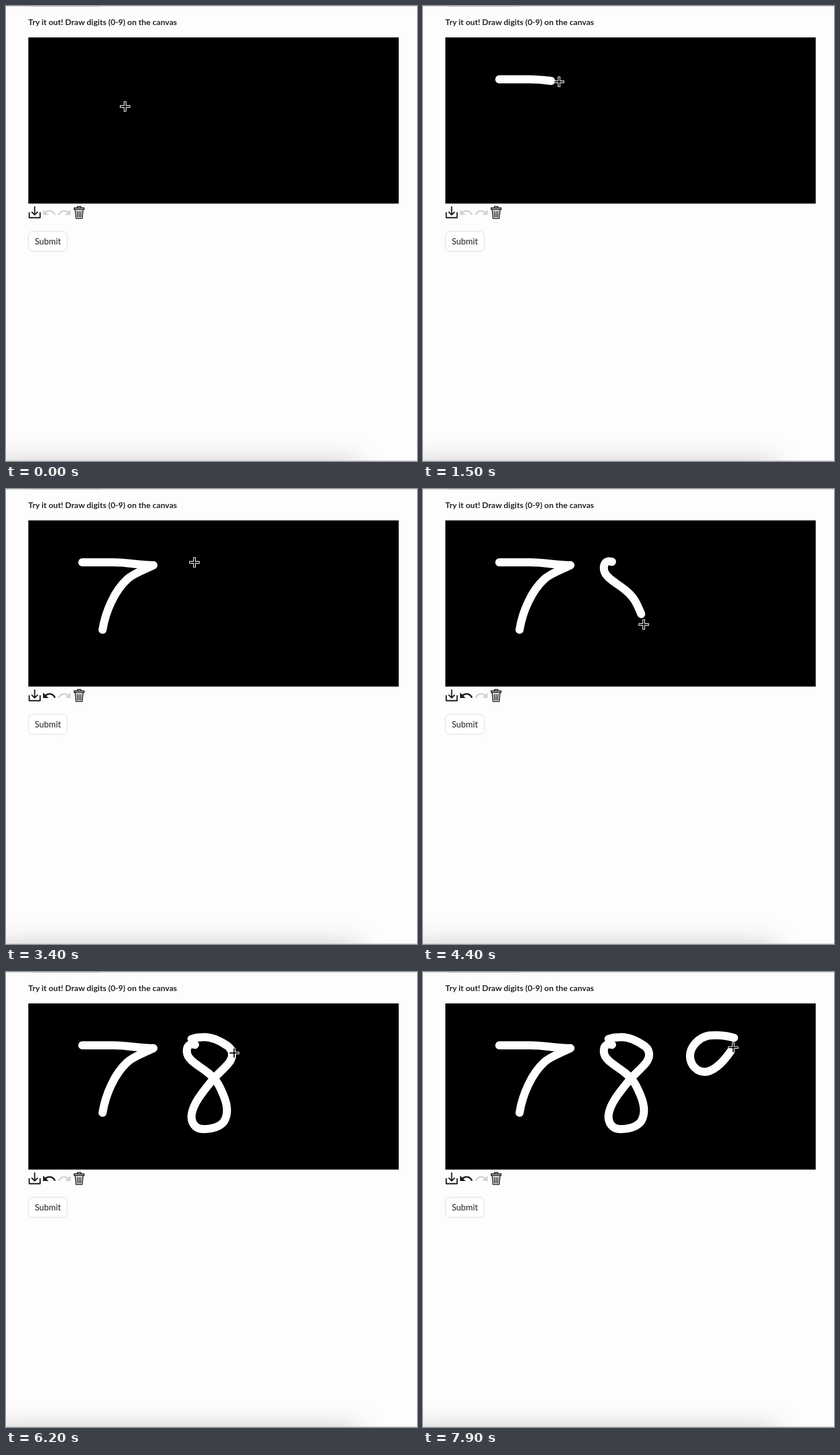
Write an HTML page that moves like this. It is 711 px wide and 788 px high and loops after 8000 ms.

```html
<!DOCTYPE html>
<html lang="en">
<head>
<meta charset="utf-8">
<title>Draw digits</title>
<style>
  html, body { margin: 0; width: 100%; height: 100%; overflow: hidden; background: #fdfdfd; }
  svg { display: block; overflow: hidden; }
  text { font-family: Lato, "Open Sans", sans-serif; fill: #22232a; }
  .shadow { fill: rgba(45, 25, 50, .25); filter: blur(23px); }
  .track { fill: none; stroke: none; stroke-width: 14; stroke-linecap: round; stroke-linejoin: round; }
  .icon { fill: none; stroke: #1c1c1e; stroke-width: 1.6; stroke-linejoin: round; stroke-linecap: round; }
</style>
</head>
<body>
<svg width="711" height="788" viewBox="0 0 711 788">
  <rect class="shadow" x="-20" y="791" width="628" height="80"/>
  <path d="M0 .5H711M0 787.5H711" stroke="#cfcfcf"/>
  <path d="M42 .5H165" stroke="#b4b4b6"/>
  <text x="38.6" y="32.5" font-size="14.1" font-weight="700">Try it out! Draw digits (0-9) on the canvas</text>
  <rect x="38.6" y="54.4" width="640.8" height="287.8"/>

  <path class="icon" d="M40.2 358V366.6H59V358M49.6 348V361.5M44.8 357L49.6 361.8L54.4 357" style="stroke-width:2.1"/>
  <defs>
    <path id="arrow" d="M12.5 8c-2.65 0-5.05.99-6.9 2.6L2 7v9h9l-3.62-3.62c1.39-1.16 3.16-1.88 5.12-1.88 3.54 0 6.55 2.31 7.6 5.5l2.37-.78C21.08 11.03 17.15 8 12.5 8z"/>
  </defs>
  <use id="undo" href="#arrow" transform="translate(61.9 345) scale(1.07)"/>
  <use href="#arrow" transform="translate(114 345) scale(-1.07 1.07)" fill="#d3d3d3"/>
  <path class="icon" d="M118 349.6H135V352.4H118ZM123.5 349.4V347.2H129.5V349.4M119.8 353L121.2 368H131.8L133.2 353M123.3 355.5L123.8 365.5M126.5 355.5V365.5M129.7 355.5L129.2 365.5"/>

  <rect x="38.7" y="390.2" width="67.3" height="34.6" rx="8" fill="#fff" stroke="#d9d9dc"/>
  <text x="72.4" y="412.8" font-size="14.8" text-anchor="middle">Submit</text>

  <g id="tracks"></g>
  <g id="cursor" fill="none">
    <path d="M-9 0H9M0 -9V9" stroke="#fff" stroke-width="4.4"/>
    <path d="M-8 0H8M0 -8V8" stroke="#000" stroke-width="2"/>
  </g>
</svg>
<script>
const LOOP = 8000, STEP = 100, UNDO_READY = 2500;
const INK_LAG = 60, PEN_HOLD = 40;

const linear = u => u;
const easeOut = u => u * (2 - u);
const smooth = u => u * u * (3 - 2 * u);
const byId = id => document.getElementById(id);
const tracks = [];

// The cursor follows the path from start to end; with a pen-down time it leaves ink.
function track(start, end, ease, d, down) {
  const path = document.createElementNS("http://www.w3.org/2000/svg", "path");
  path.setAttribute("class", "track");
  path.setAttribute("d", d);
  byId("tracks").append(path);
  const length = path.getTotalLength();
  const travelled = t => length * ease(Math.min(1, Math.max(0, (t - start) / (end - start))));
  tracks.push({ path, end, down, begin: down ?? start, travelled });
}

track(0, 900, smooth, "M206 174C190 115 142 -8 132 127");
// 7
track(1200, 1700, easeOut, "M132 127H185C215 127 225 132 255 132", 1000);
track(1700, 2500, smooth, "M255 132C240 140 222 145 210 156C188 176 172 212 167 244", 1700);
track(2700, 3400, smooth, "M167 245C200 230 290 150 326 127");
// 8
track(3800, 4750, smooth, "M327 126C317 123 312 129 313 139C314 153 334 162 350 175C366 188 370 199 376 213C384 232 384 248 377 259C370 268 357 272 341 272", 3700);
track(4750, 5400, linear, "M341 272C328 272 320 262 321 248C323 228 341 207 358 186C366 177 378 167 386 157C394 146 393 133 380 126C366 117 352 112 340 113C330 113 322 115 314 119", 4750);
track(5800, 6800, smooth, "M314 119C370 150 480 148 541 119L538 115");
// 9
track(7000, 8000, smooth, "M538 114C524 110 508 109 495 110C477 113 461 130 462 147C463 162 474 173 488 173C505 172 522 152 531 139L540 126", 6900);

function draw(t) {
  for (const { path, end, down, travelled } of tracks) {
    path.style.stroke = t >= down ? "#fff" : "none";
    path.style.strokeDasharray = `${travelled(Math.min(t, end + PEN_HOLD) - INK_LAG)} 999`;
  }
  const active = tracks.filter(k => k.begin <= t).pop();
  const { x, y } = active.path.getPointAtLength(active.travelled(t));
  byId("cursor").setAttribute("transform", `translate(${x} ${y})`);
  byId("undo").setAttribute("fill", t >= UNDO_READY ? "#1c1c1e" : "#d3d3d3");
}

const began = performance.now();
function tick() {
  const t = (performance.now() - began) % LOOP;
  draw(Math.floor(t / STEP) * STEP);
  requestAnimationFrame(tick);
}
tick();
</script>
</body>
</html>
```
